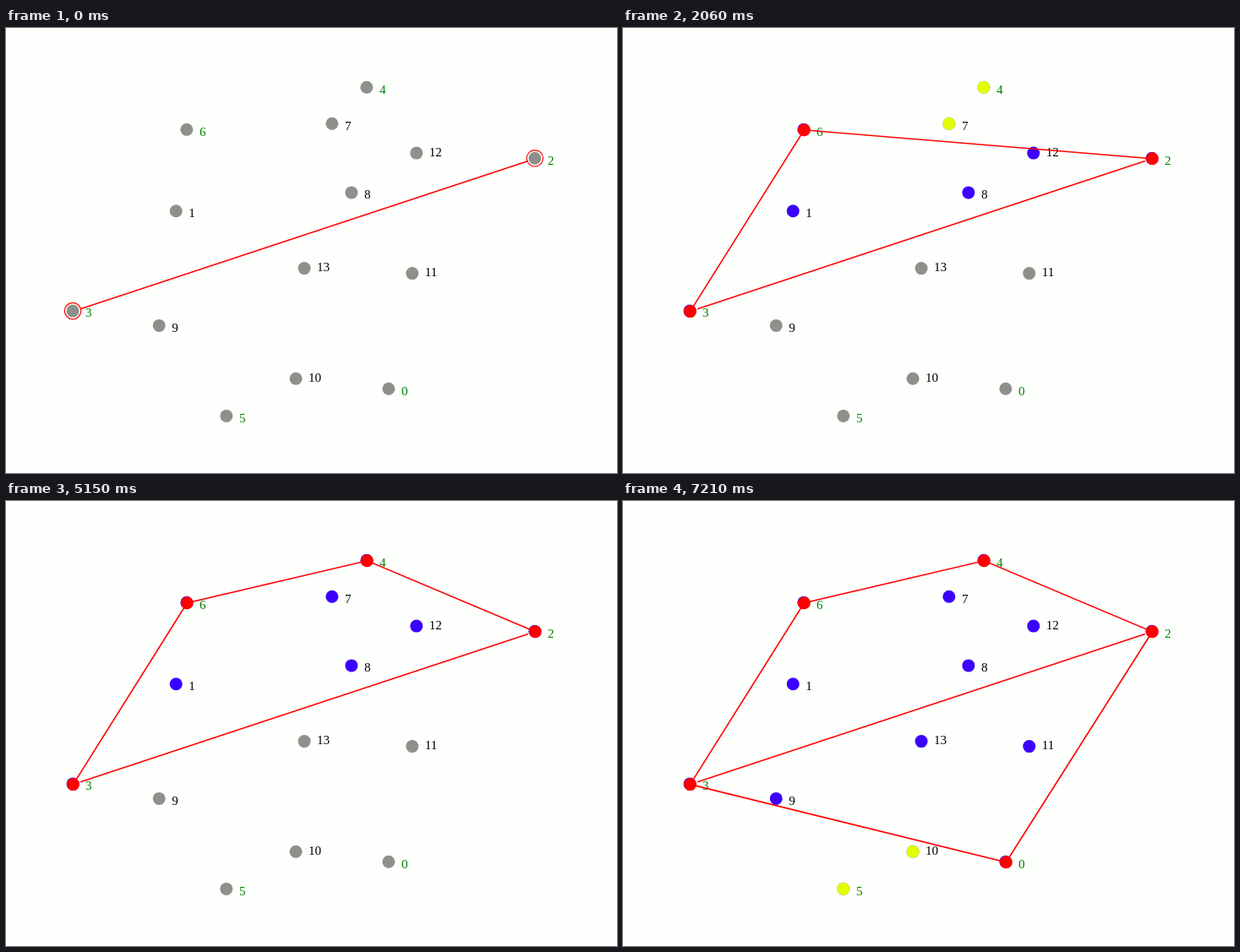
Animation, 723 px wide and 527 px high, one loop 8000 ms. Source, as an HTML page with a canvas:

```html
<!DOCTYPE html>
<html lang="en">
<head>
<meta charset="utf-8">
<title>Convex hull steps</title>
<style>
  html, body { margin: 0; width: 100%; height: 100%; overflow: hidden; background: #fdfffc; }
  canvas { display: block; }
</style>
</head>
<body>
<canvas id="stage" width="723" height="527"></canvas>
<script>
const ctx = document.getElementById('stage').getContext('2d');
const GRAY = '#8e908c', RED = '#ff0000', BLUE = '#3c00ff', YELLOW = '#e1ff00', LIME = '#80ff00';
const BEAT = 1030, LOOP = 8000;

// Index is the printed label.
const points = [
  [452.8, 427.3], [201.2, 216.8], [625.8, 154.3], [79, 335.1], [426.8, 70.3],
  [260.8, 459.4], [213.8, 120.3], [385.8, 113.3], [408.8, 194.9], [181.2, 352.4],
  [343, 415.2], [480.7, 290.6], [485.7, 148.1], [353, 284.6]
];
const outer = [0, 2, 3, 4, 5, 6];
const ends = [3, 2];
const [left, right] = ends.map(id => points[id]);

// apex: farthest point being measured; split: edge about to be dropped.
const steps = [
  { beat: 0, hull: [] },
  { beat: 1, hull: ends, apex: 6 },
  { beat: 2, hull: [3, 6, 2] },
  { beat: 4, hull: [3, 6, 4, 2], split: [6, 2] },
  { beat: 5, hull: [3, 6, 4, 2] },
  { beat: 6, hull: [3, 6, 4, 2], apex: 0 },
  { beat: 7, hull: [3, 6, 4, 2, 0, 3] }
];

const mix = (a, b, k) => a + (b - a) * k;
const baseAt = x => mix(left[1], right[1], (x - left[0]) / (right[0] - left[0]));
const isAbove = id => points[id][1] < baseAt(points[id][0]);
const sameSide = (a, b) => !ends.includes(a) && !ends.includes(b) && isAbove(a) === isAbove(b);

function pathOf(ids) {
  const path = new Path2D();
  ids.forEach(id => path.lineTo(...points[id]));
  return path;
}

function strokeLine(from, to) {
  ctx.beginPath();
  ctx.moveTo(...from);
  ctx.lineTo(...to);
  ctx.stroke();
}

function circle([x, y], radius) {
  ctx.beginPath();
  ctx.arc(x, y, radius, 0, 2 * Math.PI);
}

function dot(id, color) {
  circle(points[id], 7.5);
  ctx.fillStyle = color;
  ctx.fill();
  if (color !== YELLOW) return;
  ctx.strokeStyle = GRAY;
  ctx.lineWidth = 0.6;
  ctx.setLineDash([1.5, 1.5]);
  ctx.stroke();
  ctx.setLineDash([]);
}

function label(id) {
  const [x, y] = points[id];
  ctx.fillStyle = outer.includes(id) ? '#008000' : '#000';
  ctx.fillText(id, x + 15.1, Math.round(y + (id > 9 ? -1.4 : 2.25)) + 5);
}

// Dashes run from the point to the base line.
function drop([x, y]) {
  ctx.strokeStyle = LIME;
  ctx.lineWidth = 2;
  ctx.setLineDash([13, 11]);
  strokeLine([x - 0.2, y], [x - 0.2, baseAt(x) + 0.5]);
  ctx.setLineDash([]);
}

function colorOf(id, hull) {
  if (ctx.isPointInPath(pathOf(hull), ...points[id])) return BLUE;
  return hull.some(corner => sameSide(corner, id)) ? YELLOW : GRAY;
}

function draw({ hull, apex, split = [] }) {
  ctx.fillStyle = '#fdfffc';
  ctx.fillRect(0, 0, 723, 527);
  ctx.font = '15px "Liberation Serif", serif';
  points.forEach((_, id) => label(id));
  if (apex !== undefined) points.filter((_, id) => sameSide(id, apex)).forEach(drop);
  points.forEach((_, id) => dot(id, colorOf(id, hull)));

  ctx.save();
  ctx.translate(0.5, 0.5);
  ctx.strokeStyle = RED;
  ctx.lineWidth = 1.6;
  const [start, stop] = [0.0155, 0.9845].map(k => [0, 1].map(axis => mix(left[axis], right[axis], k)));
  strokeLine(start, stop);
  if (hull.length > 2) ctx.stroke(pathOf(hull));
  ctx.stroke(pathOf(split));
  points.forEach((_, id) => { if (id === apex || hull.includes(id)) dot(id, RED); });
  ctx.restore();

  if (hull.length) return;
  ctx.strokeStyle = RED;
  ctx.lineWidth = 1.2;
  for (const id of ends) {
    circle(points[id], 9.7);
    ctx.stroke();
  }
}

function tick() {
  const t = performance.now() % LOOP;
  draw(steps.findLast(step => step.beat * BEAT <= t));
  requestAnimationFrame(tick);
}
tick();
</script>
</body>
</html>
```
